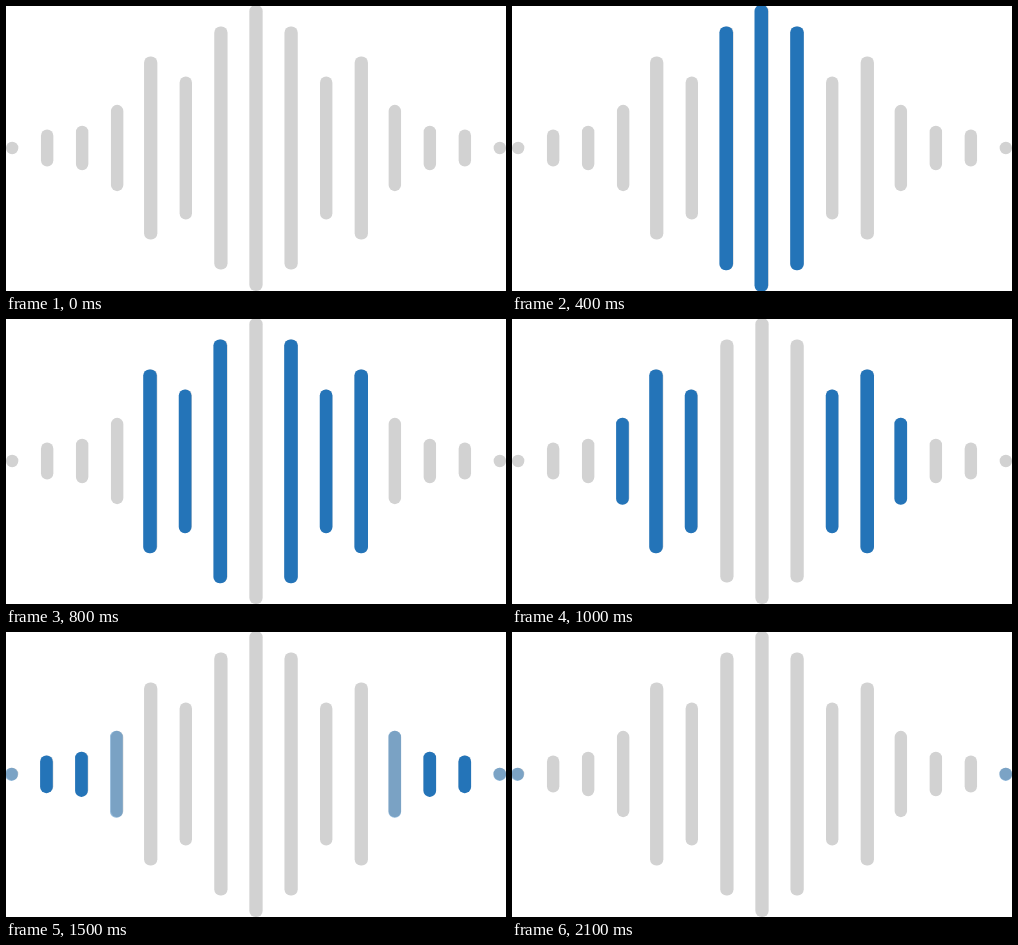
An HTML page for the animation above (2200 ms loop, 500 by 285 pixels).

```html
<!DOCTYPE html>
<html lang="en">
<head>
<meta charset="utf-8">
<title>Sound wave</title>
<style>
  html, body { margin: 0; width: 100%; height: 100%; overflow: hidden; background: #fff; }
  svg { display: block; }
</style>
</head>
<body>
<svg id="wave" width="500" height="285" viewBox="0 0 500 285"></svg>
<script>
const STEP = 100, STEPS = 22, LAST = 7;
const GREY = '#d2d2d2', BLUE = '#2474b8';
const wave = document.getElementById('wave');

// Bar heights from the middle outwards
const heights = [286, 243, 143, 183, 86.3, 44.4, 36.9, 12.4];

// Inner bars are spaced from the middle, outer ones from the edge
const offset = i => i < 4 ? 35.1 * i : 243.85 - 35 * (LAST - i);

function bar(cx, cy, width, height, fill) {
  const rect = document.createElementNS('http://www.w3.org/2000/svg', 'rect');
  const attrs = { x: cx - width / 2, y: cy - height / 2, width, height, rx: 6.2, fill };
  for (const key in attrs) rect.setAttribute(key, attrs[key]);
  wave.append(rect);
  return rect;
}

// Blue bars are a little larger than the grey ones beneath and sit to their left
const lit = heights.map((height, i) => {
  const width = height > 150 ? 13.3 : 12.4;
  return (i ? [-1, 1] : [-1]).map(side => {
    const cx = 250 + side * offset(i);
    bar(cx, 142, width, height, GREY);
    return bar(cx - (side < 0 ? 0.7 : 0.1), 142.3, width + 0.3, height + 0.8, BLUE);
  });
});

// Fade in over two steps, hold, fade out over two
const level = age => Math.max(0, Math.min(1, age / 2, (8 - age) / 2));

const start = performance.now();
function tick() {
  const step = Math.floor((performance.now() - start) / STEP) % STEPS;
  lit.forEach((bars, i) => {
    for (const b of bars) b.setAttribute('opacity', level(step - 2 * i));
  });
  requestAnimationFrame(tick);
}
tick();
</script>
</body>
</html>
```
